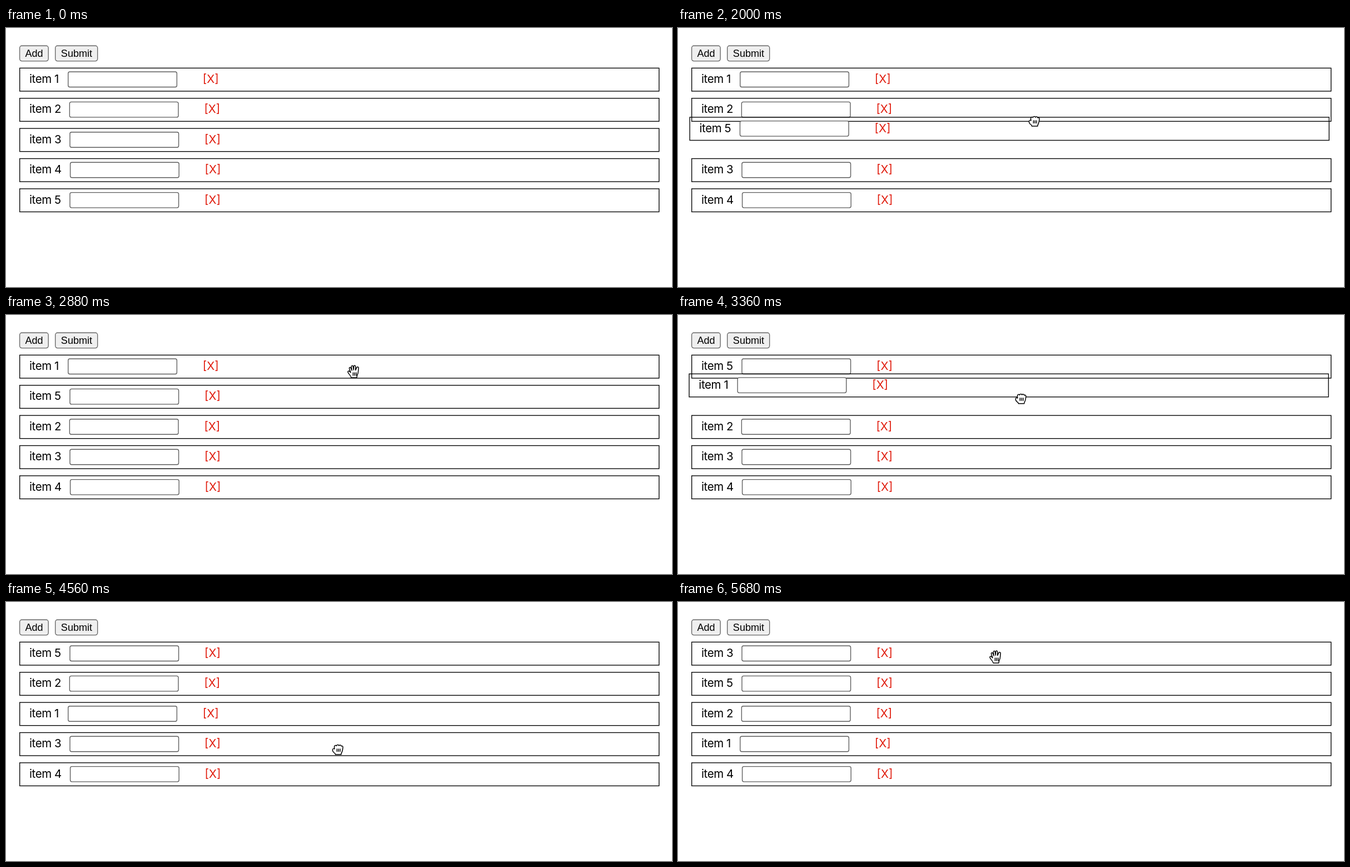
An HTML page that plays this animation: 1198x467 px, repeating every 6.24 s.

```html
<!DOCTYPE html>
<html lang="en">
<head>
<meta charset="utf-8">
<title>Sortable list</title>
<style>
html, body { margin: 0; width: 100%; height: 100%; overflow: hidden; background: #fff; }
svg { display: block; width: 1198px; height: 467px; }
rect { stroke-width: 1.36; }
.row { fill: none; stroke: #000; }
.input { fill: #fff; stroke: #5c5c5c; }
.button { fill: #efefef; stroke: #666; }
text { font: 20.5px Inter, sans-serif; letter-spacing: -.02em; }
.label { font: 18.1px "Liberation Sans", Arial, sans-serif; letter-spacing: 0; text-anchor: middle; }
.remove { fill: #e01b0c; letter-spacing: 0; }
#cursor path { fill: #fff; stroke: #000; stroke-width: 1.5; stroke-linejoin: round; stroke-linecap: round; }
#cursor .arrow { fill: #000; stroke: #fff; }
</style>
</head>
<body>
<svg viewBox="0 0 1198 467">
  <rect class="button" x="24.6" y="32" width="51.6" height="27.6" rx="4"/>
  <text class="label" x="50.5" y="51.6">Add</text>
  <rect class="button" x="88.7" y="32" width="76" height="27.6" rx="4"/>
  <text class="label" x="127" y="51.6">Submit</text>
  <g id="list"></g>
  <g id="cursor">
    <path class="open" d="M-4 11C-4.5 7-9 4.5-10 1C-10.3-1.2-8.2-1.7-6.8 0L-5 1.8L-7.4-5C-8.2-7.5-5.6-8.6-4.6-6.2L-2.8-2L-3.8-8.4C-4-11-1.2-11.5-.7-9L.4-3L.6-9.2C.8-11.6 3.6-11.4 3.7-9L3.8-2.6L5.8-7.2C6.9-9.4 9.8-8.4 9.2-6C8.4-2.6 9.6 2 6.6 7L6 11ZM-.6 2V7M2.2 2V7M5 2V7"/>
    <path class="closed" d="M-4.5 9L-5.2 7C-8.2 5-10 2.4-9.5 0C-9-2-7-2-6-1L-6.5-4.2C-6.8-7.6-3.6-8.3-2.5-6.6C-2-9 1.4-9 2-6.9C3-8.8 5.9-8.1 6.1-6C7.5-7.2 9.3-5.8 9-4C8.7 0 8.5 3 6.3 6.5L5.8 9ZM-1.6-1V3.4M1.2-1V3.4M4-1V3.4"/>
    <path class="arrow" d="M-6-11V9L-1.6 5L1.4 12L5 10.4L2 3.6H8Z"/>
  </g>
</svg>
<script>
const LOOP = 6240, STEP = 80, PITCH = 54.4;
const list = document.getElementById('list');
const cursor = document.getElementById('cursor');

// Pointer path: time, x, y
const path = [
  [560, 622, 446], [1120, 645, 310],
  [1680, 645, 310], [2000, 641, 168], [2240, 639, 128], [2480, 638, 126], [2880, 625, 102],
  [3120, 625, 102], [3680, 606, 216], [3760, 610, 228], [3920, 611, 230], [4320, 597, 266],
  [4560, 597, 266], [5040, 570, 114], [5200, 570, 104], [5680, 571, 99]
];

// dx, dy: how far the held row trails the pointer
const drags = [
  { item: 5, start: 1680, end: 2400, dx: .5, dy: 13 },
  { item: 1, start: 3120, end: 3920, dx: 3.5, dy: -15 },
  { item: 3, start: 4400, end: 5280, dx: -1, dy: 6.5 }
];

const rows = [111.8, 114.4, 115, 115.6, 115].map((x, i) => {
  const g = document.createElementNS('http://www.w3.org/2000/svg', 'g');
  g.innerHTML = `
    <rect class="row" x="24.7" y="72.3" width="1150" height="41.6"/>
    <text x="42" y="99">item ${i + 1}</text>
    <rect class="input" x="${x}" y="79" width="195.6" height="27.5" rx="3"/>
    <text class="remove" x="${x + 242}" y="99">[X]</text>`;
  return list.appendChild(g);
});

function pointer(t) {
  const i = path.findIndex(k => k[0] > t);
  if (i < 0) return path.at(-1).slice(1);
  if (i === 0) return path[0].slice(1);
  const [t0, x0, y0] = path[i - 1], [t1, x1, y1] = path[i];
  const u = (t - t0) / (t1 - t0);
  return [x0 + (x1 - x0) * u, y0 + (y1 - y0) * u];
}

const move = (el, x, y) => el.setAttribute('transform', `translate(${x} ${y})`);

function draw(t) {
  const order = [1, 2, 3, 4, 5];
  let held = null;
  for (const d of drags) {
    if (t < d.start) break;
    const [gx, gy] = pointer(d.start);
    const [x, y] = pointer(Math.min(t, d.end));
    const from = order.indexOf(d.item);
    // The gap moves on when the pointer enters the next row.
    const slot = d.dy > 0 ? Math.ceil((y - 113) / PITCH) : Math.floor((y - 72) / PITCH);
    order.splice(from, 1);
    order.splice(slot, 0, d.item);
    if (t < d.end) {
      const lag = Math.min(1, Math.abs(y - gy) / 20);
      held = { item: d.item, x: x - gx + d.dx * lag, y: from * PITCH + y - gy + d.dy * lag };
    }
  }
  order.forEach((n, i) => move(rows[n - 1], 0, i * PITCH));
  if (held) {
    const row = rows[held.item - 1];
    move(row, held.x, held.y);
    if (list.lastChild !== row) list.append(row);
  }

  const [x, y] = pointer(t);
  const shape = held ? 'closed' : y > 333 ? 'arrow' : 'open';
  cursor.style.display = t < path[0][0] ? 'none' : '';
  move(cursor, x, y);
  for (const p of cursor.children)
    p.style.display = p.classList.contains(shape) ? '' : 'none';
}

const began = performance.now();
function tick() {
  const t = (performance.now() - began) % LOOP;
  draw(Math.floor(t / STEP) * STEP);
  requestAnimationFrame(tick);
}
tick();
</script>
</body>
</html>
```
